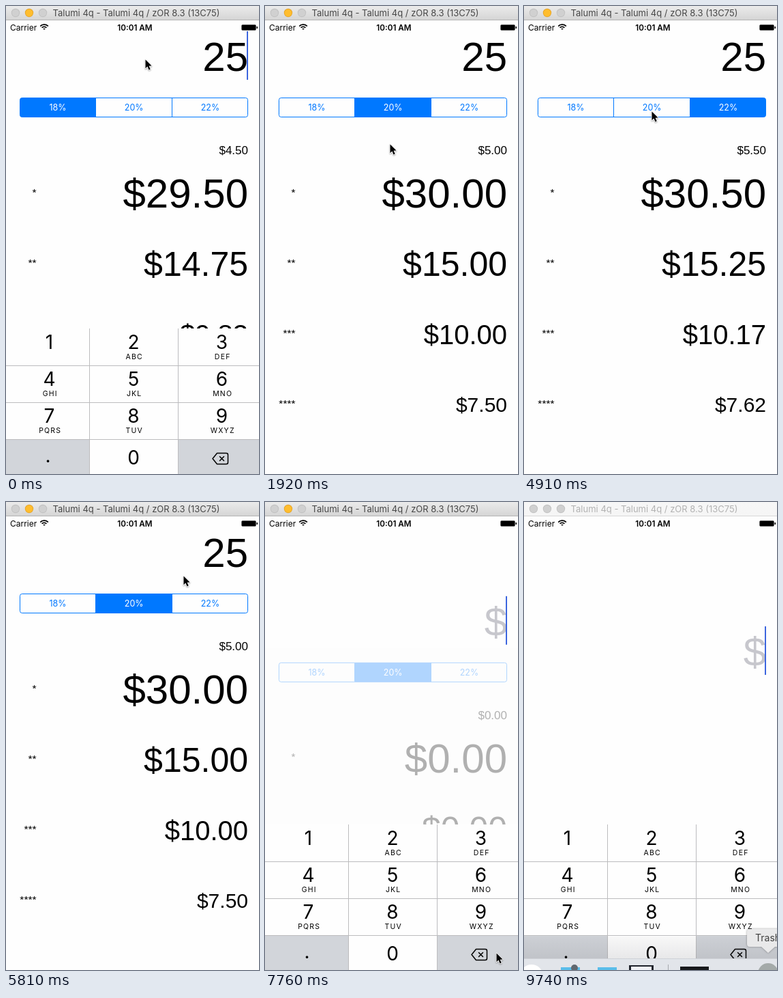
An HTML page with a canvas that plays this animation: 371x685 px, repeating every 9840 ms.

```html
<!DOCTYPE html>
<html lang="en">
<head>
<meta charset="utf-8">
<title>Tip calculator</title>
<style>
html, body { margin: 0; width: 100%; height: 100%; overflow: hidden; background: #fefefe; }
canvas { display: block; }
</style>
</head>
<body>
<canvas id="stage" width="371" height="685"></canvas>
<script>
const W = 371, H = 685, LOOP = 9840;
const ctx = document.getElementById('stage').getContext('2d');
const UI = 'Inter, Roboto, sans-serif';
const BIG = '"Liberation Sans", Arial, sans-serif';
const BLUE = '#0078ff', PAPER = '#fefefe', KEY_GRAY = '#d2d5da';
const RATES = [18, 20, 22];

// Pointer stops: arrival time, x, y. Each glide takes up to GLIDE ms.
const GLIDE = 300;
const STOPS = [
  [0, 204, 78], [600, 187, 148], [1160, 183, 202], [2670, 136, 149], [3110, 177, 163],
  [3710, 180, 157], [4310, 282, 147], [4910, 187, 154], [5360, 126, 135],
  [5810, 260, 108], [6560, 385, 400], [6710, 339, 660], [8060, 270, 178], [8960, 345, 690]
];

const clamp = v => Math.max(0, Math.min(1, v));
const span = (t, start, length) => clamp((t - start) / length);
const easeOut = p => 1 - (1 - p) ** 3;
const smooth = p => p * p * (3 - 2 * p);

// The screen refreshes every 150 ms
const tick = t => Math.max(0, Math.floor((t + 40) / 150) * 150 - 40);

function pointerAt(t) {
  let [, x, y] = STOPS[0], from = 0;
  for (const [at, toX, toY] of STOPS) {
    const begin = Math.max(from, at - GLIDE);
    const p = at > begin ? span(t, begin, at - begin) : 1;
    if (p > 0) { x += (toX - x) * p; y += (toY - y) * p; }
    from = at;
    if (p < 1) break;
  }
  return [x, y];
}

function stateAt(t) {
  const hide = easeOut(span(t, 1280, 340)), show = easeOut(span(t, 6200, 340));
  return {
    choice: t < 750 ? 0 : t < 4450 || t > 5050 ? 1 : 2,
    bill: '25'.slice(0, t < 7000 ? 2 : t < 7450 ? 1 : 0),
    lowered: hide - show,
    caret: (t < 1300 || t > 6250) && !(t > 8200 && (t - 8200) % 800 < 300),
    pressed: t > 7000 && t < 7600 && (t - 7000) % 450 < 150,
    empty: smooth(span(t, 7570, 300)),
    dock: smooth(span(t, 8900, 350)),
    tip: t > 9550,
    active: t < 9700
  };
}

function rect(x, y, w, h, color) {
  ctx.fillStyle = color;
  ctx.fillRect(x, y, w, h);
}

function round(x, y, w, h, r) {
  ctx.beginPath();
  ctx.roundRect(x, y, w, h, r);
}

function disc(x, y, r, color) {
  ctx.beginPath();
  ctx.arc(x, y, r, 0, Math.PI * 2);
  ctx.fillStyle = color;
  ctx.fill();
}

function poly(points) {
  ctx.beginPath();
  points.forEach(([x, y]) => ctx.lineTo(x, y));
  ctx.closePath();
}

function fade(y, h, top, bottom) {
  const shade = ctx.createLinearGradient(0, y, 0, y + h);
  shade.addColorStop(0, top);
  shade.addColorStop(1, bottom);
  rect(0, y, W, h, shade);
}

function text(str, x, y, size, { font = UI, align = 'center', color = '#000', weight = 400, gap = 0 } = {}) {
  ctx.font = `${weight} ${size}px ${font}`;
  ctx.textAlign = align;
  ctx.fillStyle = color;
  ctx.letterSpacing = gap + 'px';
  ctx.fillText(str, x, y);
  ctx.letterSpacing = '0px';
}

// Right-aligned figure centred on a line
const amount = (str, middle, size, color) =>
  text(str, 355, middle + size * 0.345, size, { font: BIG, align: 'right', color });
const money = v => '$' + Math.max(0, v - 1e-9).toFixed(2);

function segments(choice) {
  ctx.save();
  round(20.5, 134.5, 334, 28, 3);
  ctx.clip();
  rect(20 + 112 * choice, 134, 112, 29, BLUE);
  ctx.restore();
  ctx.strokeStyle = BLUE;
  ctx.lineWidth = 1;
  ctx.stroke();
  RATES.forEach((rate, i) => {
    if (i) rect(19 + 112 * i, 135, 1, 27, BLUE);
    text(rate + '%', 76 + 111.7 * i, 153, 12.5, { color: i === choice ? '#fff' : BLUE });
  });
}

function content(s) {
  ctx.save();
  ctx.translate(0, 145 * s.empty);
  amount(s.bill || '$', 74.5, 60, s.bill ? '#000' : '#c7c7cd');
  if (s.caret) rect(353, 37, 2, 71, '#3c66df');

  const bill = Number(s.bill), tip = bill * RATES[s.choice] / 100;
  segments(s.choice);
  amount(money(tip), 211, 17);
  for (let i = 0; i < 4; i++) {
    const y = 274.5 + 103.2 * i;
    amount(money((bill + tip) / (i + 1)), y, 60 - 10 * i);
    text('*'.repeat(i + 1), 44.5, y + 3, 15.5, { font: BIG, align: 'right' });
  }
  ctx.globalAlpha = s.empty;
  rect(0, 112, W, H, PAPER);
  ctx.restore();
}

function eraseIcon() {
  ctx.strokeStyle = '#000';
  ctx.lineWidth = 1.5;
  ctx.lineJoin = ctx.lineCap = 'round';
  ctx.beginPath();
  ctx.moveTo(303, 662.5);
  ctx.lineTo(309.5, 654.5);
  ctx.arcTo(325.5, 654.5, 325.5, 662, 2.5);
  ctx.arcTo(325.5, 670.5, 315, 670.5, 2.5);
  ctx.lineTo(309.5, 670.5);
  ctx.closePath();
  for (const d of [-3, 3]) {
    ctx.moveTo(316.5 - d, 659.5);
    ctx.lineTo(316.5 + d, 665.5);
  }
  ctx.stroke();
}

function keyboard(s) {
  ctx.save();
  ctx.translate(0, 216 * s.lowered);
  rect(0, 472, W, 216, PAPER);
  rect(0, 634, 122, 54, KEY_GRAY);
  rect(253, 634, 118, 54, s.pressed ? PAPER : KEY_GRAY);
  for (let i = 1; i < 4; i++) rect(0, 472 + 54 * i, W, 1, '#bcbcbe');
  for (const x of [122, 252]) rect(x, 472, 1, 216, '#bcbcbe');
  const letters = ['', 'ABC', 'DEF', 'GHI', 'JKL', 'MNO', 'PQRS', 'TUV', 'WXYZ'];
  letters.forEach((label, i) => {
    const x = 63.5 + 126.5 * (i % 3) - (i % 3 === 1 ? 3 : 0), y = 502 + 54 * Math.floor(i / 3);
    text(i + 1, x, y, 28);
    text(label, x + 1.2, y + 15, 10.5, { gap: 1.2 });
  });
  text('.', 61.5, 668, 28);
  text('0', 187, 671, 28);
  eraseIcon();
  ctx.restore();
}

function titleBar(active) {
  fade(0, 21, active ? '#ebebeb' : '#f7f7f7', active ? '#d4d4d4' : '#f5f5f5');
  rect(0, 20, W, 1, active ? '#b4b4b4' : '#d8d8d8');
  for (let i = 0; i < 3; i++) {
    const lit = active && i === 1, x = 14 + 20 * i;
    disc(x, 10, 6.2, lit ? '#e5a52c' : '#c0c0c0');
    disc(x, 10, 5.3, lit ? '#ffbd2e' : '#d0d0d0');
  }
  text('Talumi 4q - Talumi 4q / zOR 8.3 (13C75)', 191, 15, 13, { color: active ? '#474747' : '#b2b2b2' });
}

function statusBar() {
  text('Carrier', 6, 35.5, 12, { align: 'left' });
  text('10:01 AM', 189, 35.5, 11.7, { weight: 600 });
  ctx.strokeStyle = '#000';
  ctx.lineWidth = 1.7;
  ctx.lineCap = 'butt';
  for (let r = 1.5; r < 8; r += 3.2) {
    ctx.beginPath();
    ctx.arc(56, 35, r, -Math.PI * 0.76, -Math.PI * 0.24);
    ctx.stroke();
  }
  round(345.5, 27.5, 21, 8, 1.5);
  ctx.strokeStyle = '#666';
  ctx.lineWidth = 1;
  ctx.stroke();
  rect(346, 28, 20, 7, '#000');
  rect(367.5, 30, 1.5, 3, '#000');
}

function dock(s) {
  if (!s.dock) return;
  ctx.save();
  ctx.globalAlpha = s.dock;
  fade(636, 32, 'rgba(40,40,50,0.03)', 'rgba(40,40,50,0.1)');
  ctx.globalAlpha = 1;
  ctx.translate(0, 20 * (1 - s.dock));
  rect(0, 668, W, 17, '#e2e5ea');
  rect(0, 668, W, 1, '#cfd2d8');
  disc(11, 694, 17, '#fff');
  for (const x of [54, 108]) rect(x, 681, 28, 4, '#5abdea');
  disc(74, 682, 5, '#60686f');
  rect(154, 678, 36, 7, '#20242c');
  rect(157, 680, 30, 5, '#f2f3f8');
  rect(211, 677, 1, 8, '#a5a8ae');
  rect(229, 680, 42, 5, '#17191c');
  disc(358, 690, 15, '#a4aaa9');
  ctx.restore();
}

function tooltip() {
  ctx.save();
  round(327, 625, 80, 26, 4);
  ctx.moveTo(368, 651);
  ctx.lineTo(358, 660);
  ctx.lineTo(348, 651);
  ctx.shadowColor = 'rgba(0,0,0,0.4)';
  ctx.shadowBlur = 3;
  ctx.fillStyle = '#e9e9ea';
  ctx.fill();
  ctx.restore();
  text('Trash', 339, 643, 14, { align: 'left', color: '#404040' });
}

function pointer([x, y]) {
  ctx.save();
  ctx.translate(x + 0.5, y + 0.5);
  ctx.scale(0.88, 0.88);
  poly([[0, 0], [0, 14.5], [3.3, 11.4], [5.7, 17], [8.2, 16], [5.8, 10.6], [10.3, 10.3]]);
  ctx.shadowColor = 'rgba(0,0,0,0.35)';
  ctx.shadowBlur = 2;
  ctx.shadowOffsetY = 1;
  ctx.lineJoin = 'round';
  ctx.lineWidth = 2;
  ctx.strokeStyle = '#fff';
  ctx.stroke();
  ctx.shadowColor = 'transparent';
  ctx.fillStyle = '#000';
  ctx.fill();
  ctx.restore();
}

function draw(now) {
  const t = tick(now % LOOP), s = stateAt(t);
  rect(0, 0, W, H, PAPER);
  content(s);
  keyboard(s);
  statusBar();
  titleBar(s.active);
  dock(s);
  if (s.tip) tooltip();
  pointer(pointerAt(t));
}

const start = performance.now();
function loop() {
  draw(performance.now() - start);
  requestAnimationFrame(loop);
}
loop();
</script>
</body>
</html>
```
